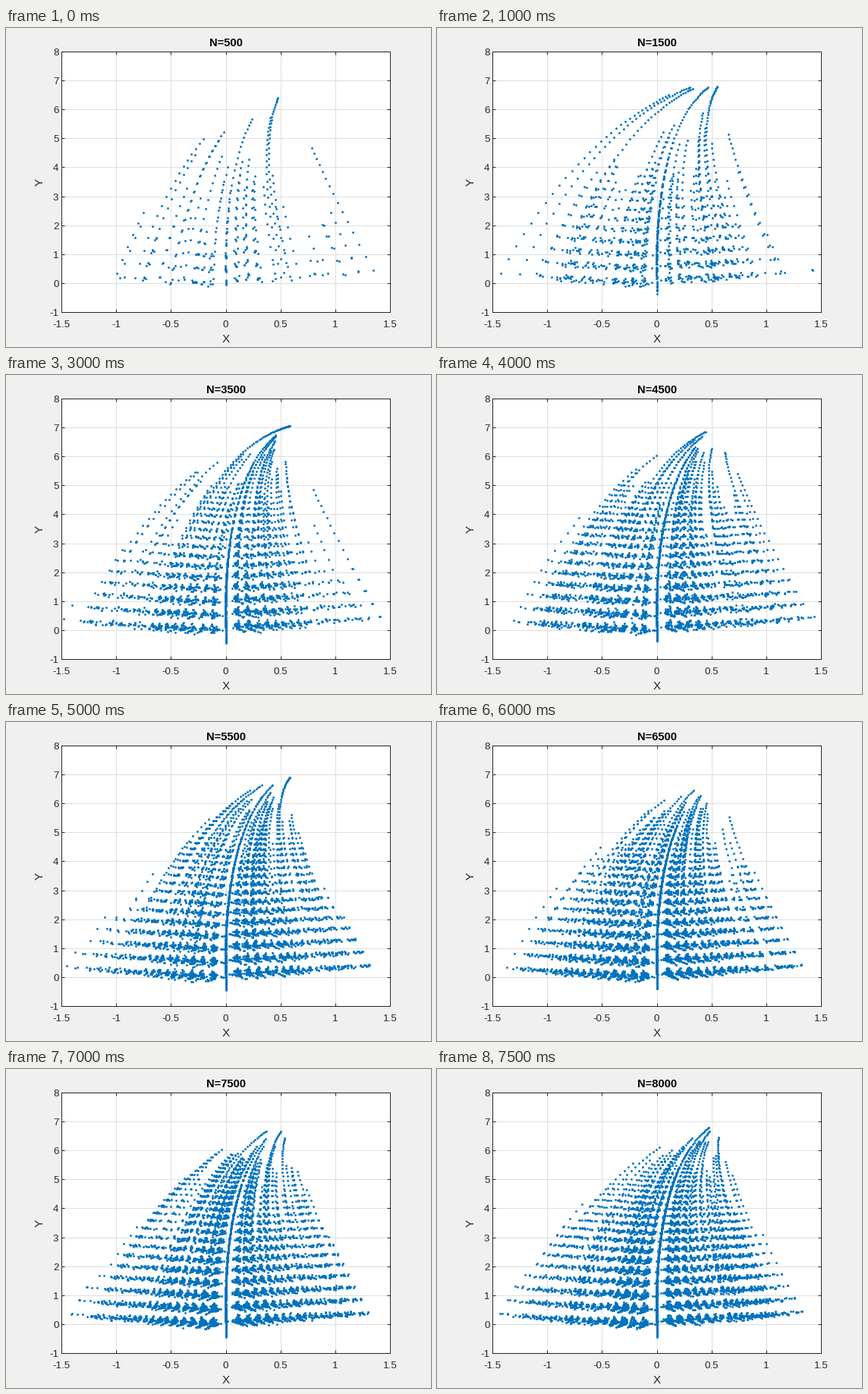
These frames come from a looping animation (560 by 420 pixels, 8000 ms). A matplotlib script:

```python
import random

import matplotlib.pyplot as plt
import numpy as np
from matplotlib.animation import FuncAnimation

W, H, DPI = 560, 420, 96
L, R, T, B = 73, 506, 31, 374
X0, X1, Y0, Y1 = -1.5, 1.5, -1, 8
INK, BLUE = "#262626", "#0072BD"
STEP, FRAMES = 500, 16

# Affine maps of the fern (a, b, c, d, e, f) and their odds
MAPS = [
    (0, 0, 0, 0.25, 0, -0.4),
    (0.95, 0.005, -0.005, 0.93, -0.002, 0.5),
    (0.035, -0.2, 0.16, 0.04, -0.09, 0.02),
    (-0.04, 0.2, 0.16, 0.04, 0.083, 0.12),
]
ODDS = (0.02, 0.84, 0.07, 0.07)


def fern(n, seed):
    """Play the chaos game for n points."""
    rng = random.Random(seed)
    x = y = 0
    points = []
    for a, b, c, d, e, f in rng.choices(MAPS, ODDS, k=n):
        x, y = a * x + b * y + e, c * x + d * y + f
        points.append((x, y))
    return np.array(points)


def label(x, y, s, size=10, color=INK, ha="center", **kw):
    return fig.text(x / W, 1 - y / H, s, size=size, color=color, ha=ha,
                    va="baseline", **kw)


plt.rcParams["font.family"] = "Liberation Sans"
fig = plt.figure(figsize=(W / DPI, H / DPI), dpi=DPI, facecolor="#F0F0F0")
ax = fig.add_axes([L / W, 1 - B / H, (R - L) / W, (B - T) / H])
xticks, yticks = np.arange(X0, X1 + 0.1, 0.5), np.arange(Y0, Y1 + 1)
ax.set(xlim=(X0, X1), ylim=(Y0, Y1), xticks=xticks, yticks=yticks)
ax.set_axisbelow(True)
ax.grid(color="#DEDEDE", linewidth=0.75)
ax.tick_params(direction="in", length=3.2, width=0.75, color=INK, top=True,
               right=True, labelbottom=False, labelleft=False)
ax.spines[:].set(color=INK, linewidth=0.75)

for v in xticks:
    label(L + (v - X0) / (X1 - X0) * (R - L), 393.5, f"{v:g}")
for v in yticks:
    label(69.5, B - (v - Y0) / (Y1 - Y0) * (B - T) + 5, f"{v:g}", ha="right")
label(290, 414.5, "X", 11.4)
label(48.5, 203, "Y", 11.4, rotation=90, rotation_mode="anchor")
title = label(290, 24, "", 11, "black", weight="bold")
dots, = ax.plot([], [], "o", color=BLUE, markersize=2.15, markeredgewidth=0)


def draw(k):
    n = STEP * (k + 1)
    dots.set_data(*fern(n, seed=n).T)
    title.set_text(f"N={n}")
    return dots, title


anim = FuncAnimation(fig, draw, frames=FRAMES, interval=500, repeat=True)
plt.show()
```
